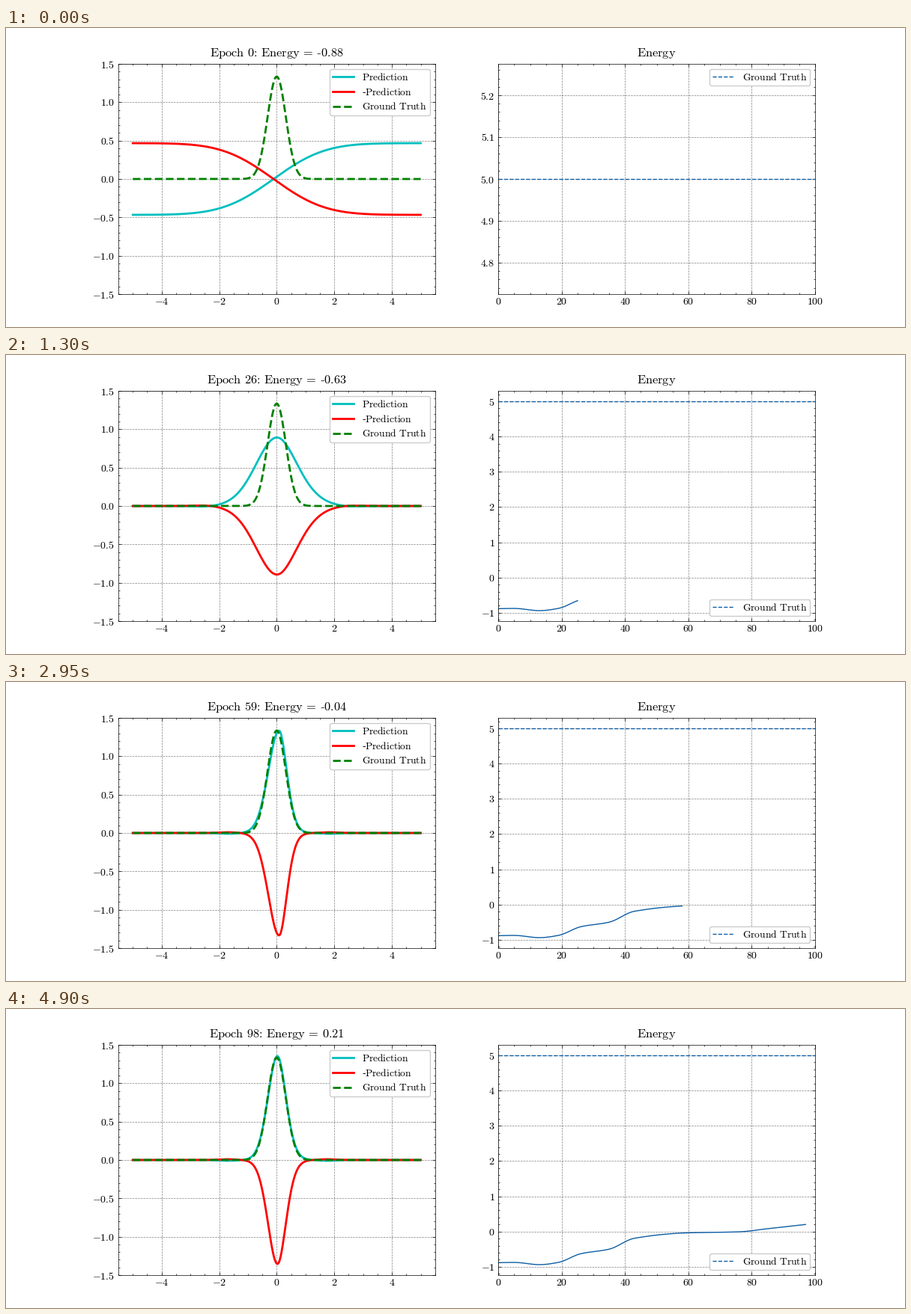
Write a matplotlib script that moves like this. It is 1200 px wide and 400 px high and loops after 4.95 s.

```python
import numpy as np
import matplotlib.pyplot as plt
from matplotlib.animation import FuncAnimation
from matplotlib.ticker import FuncFormatter

FRAMES, INTERVAL = 99, 50
BLUE = "#0C5DA5"
FIRST_BUMP = 8  # epoch at which the step has fully turned into a bump

plt.rcParams.update({
    "font.family": "Liberation Serif", "mathtext.fontset": "cm", "font.size": 10,
    "axes.linewidth": 0.5, "axes.grid": True, "axes.axisbelow": True,
    "axes.titlesize": 11.8, "axes.titlepad": 7.2, "xtick.major.pad": 3.0,
    "grid.color": "k", "grid.alpha": 0.5, "grid.linestyle": "--", "grid.linewidth": 0.5,
    "lines.linewidth": 1.0,
    "legend.framealpha": 1.0, "legend.fancybox": True, "legend.fontsize": 9.7,
    "legend.borderpad": 0.31, "legend.labelspacing": 0.43,
    "legend.handlelength": 2.06, "legend.handletextpad": 0.85,
})
for axis, far_side in (("xtick", "top"), ("ytick", "right")):
    plt.rcParams.update({
        f"{axis}.direction": "in", f"{axis}.{far_side}": True,
        f"{axis}.minor.visible": True,
        f"{axis}.major.size": 3, f"{axis}.major.width": 0.5,
        f"{axis}.minor.size": 1.5, f"{axis}.minor.width": 0.5,
    })


def roman(text):
    """Set text in upright Computer Modern with text-style spacing."""
    # Hyphens stay outside math mode, where they would become minus signs.
    parts = []
    for part in text.split("-"):
        for sign in ":=":
            part = part.replace(sign, rf"\hspace{{-0.2}}{sign}\hspace{{-0.2}}")
        part = part.replace(" ", r"\hspace{0.38}")
        parts.append(rf"$\mathrm{{{part}}}$" if part else "")
    return "-".join(parts)


def number_labels(axis, digits):
    axis.set_major_formatter(
        FuncFormatter(lambda v, _: f"${round(v, digits) + 0.0:.{digits}f}$"))


def smooth(t, knots, values):
    """Monotone cubic interpolation."""
    knots, values = np.asarray(knots, float), np.asarray(values, float)
    step = np.diff(knots)
    slope = np.diff(values) / step
    a, b = slope[:-1], slope[1:]
    same = a * b > 0
    inner = np.where(same, 2 * a * b / np.where(same, a + b, 1), 0)
    m = np.concatenate([slope[:1], inner, slope[-1:]])
    i = np.clip(np.searchsorted(knots, t, "right") - 1, 0, len(step) - 1)
    s, h = (t - knots[i]) / step[i], step[i]
    return ((1 + 2 * s) * (1 - s) ** 2 * values[i] + s * (1 - s) ** 2 * h * m[i]
            + s * s * (3 - 2 * s) * values[i + 1] + s * s * (s - 1) * h * m[i + 1])


energy = smooth(np.arange(FRAMES),
                [0, 5, 13, 19, 26, 35, 43, 59, 76, 85, 98],
                [-.884, -.877, -.94, -.875, -.63, -.50, -.19, -.04, -.008, .08, .21])


def pulse(t, centre, width):
    return np.exp(-((t - centre) / width) ** 2)


def bump(x, epoch):
    """Nearly normalised bell that grows, narrows and leans before it settles."""
    early = pulse(epoch, FIRST_BUMP, 8)
    lean = pulse(epoch, 53, 14) + 0.35 * pulse(epoch, 102, 8)
    height = 1.355 / (1 + np.exp(0.615 - 0.0235 * epoch - 0.00098 * epoch ** 2))
    width = 0.775 / (height ** 2 + 0.066 * early)
    centre = 0.9 * early + 0.1 * lean
    skew = 0.03 - 0.12 * early + 0.19 * lean

    left = x < centre
    r = np.abs(x - centre)
    z = r / (width * np.where(left, 1 + skew, 1 - skew))
    bell = height * np.exp(-z ** 2 / (1 + np.where(left, 0.07, 0.18) * z))

    reach = 2.45 * width ** 0.4
    depth = 0.01 + early * np.where(left, 0.03, -0.01)
    rise = 0.046 * early * np.log1p(np.exp(-3 * (x + 3.4))) / 3
    return bell - depth * pulse(r, reach, reach / 4) + rise


def prediction(x, epoch):
    if epoch >= FIRST_BUMP:
        return bump(x, epoch)
    u = x + 0.11
    start = 0.467 * np.tanh(0.57 * u + 0.012 * u ** 3)
    k = epoch / FIRST_BUMP
    return (1 - k) * start + k * bump(x, FIRST_BUMP)


x = np.linspace(-5, 5, 301)
truth = (10 / np.pi) ** 0.25 * np.exp(-5 * x ** 2)

fig, (ax_wave, ax_energy) = plt.subplots(1, 2, figsize=(12, 4), dpi=100)

pred_line, = ax_wave.plot(x, truth, "c", lw=2, label=roman("Prediction"))
neg_line, = ax_wave.plot(x, -truth, "r", lw=2, label=roman("-Prediction"))
ax_wave.plot(x, truth, "g--", lw=2, label=roman("Ground Truth"))
ax_wave.set(xlim=(-5.5, 5.5), ylim=(-1.5, 1.5))
ax_wave.legend(loc="upper right")
number_labels(ax_wave.xaxis, 0)
number_labels(ax_wave.yaxis, 1)

energy_line, = ax_energy.plot([], [], color=BLUE)
level = ax_energy.axhline(5, color=BLUE, ls="--", label=roman("Ground Truth"))
ax_energy.set_xlim(0, 100)
ax_energy.set_title(roman("Energy"))
number_labels(ax_energy.xaxis, 0)


def update(epoch):
    y = prediction(x, epoch)
    pred_line.set_ydata(y)
    neg_line.set_ydata(-y)
    ax_wave.set_title(roman(f"Epoch {epoch}: Energy = {energy[epoch]:.2f}"))

    energy_line.set_data(np.arange(epoch), energy[:epoch])
    low, high = (energy[:epoch].min(), 5) if epoch else (4.75, 5.25)
    margin = 0.05 * (high - low)
    ax_energy.set_ylim(low - margin, high + margin)
    number_labels(ax_energy.yaxis, 0 if epoch else 1)
    ax_energy.legend(handles=[level], loc="lower right" if epoch else "upper right")
    return pred_line, neg_line, energy_line


anim = FuncAnimation(fig, update, frames=FRAMES, interval=INTERVAL,
                     repeat=True, repeat_delay=0, blit=False)
plt.show()
```
